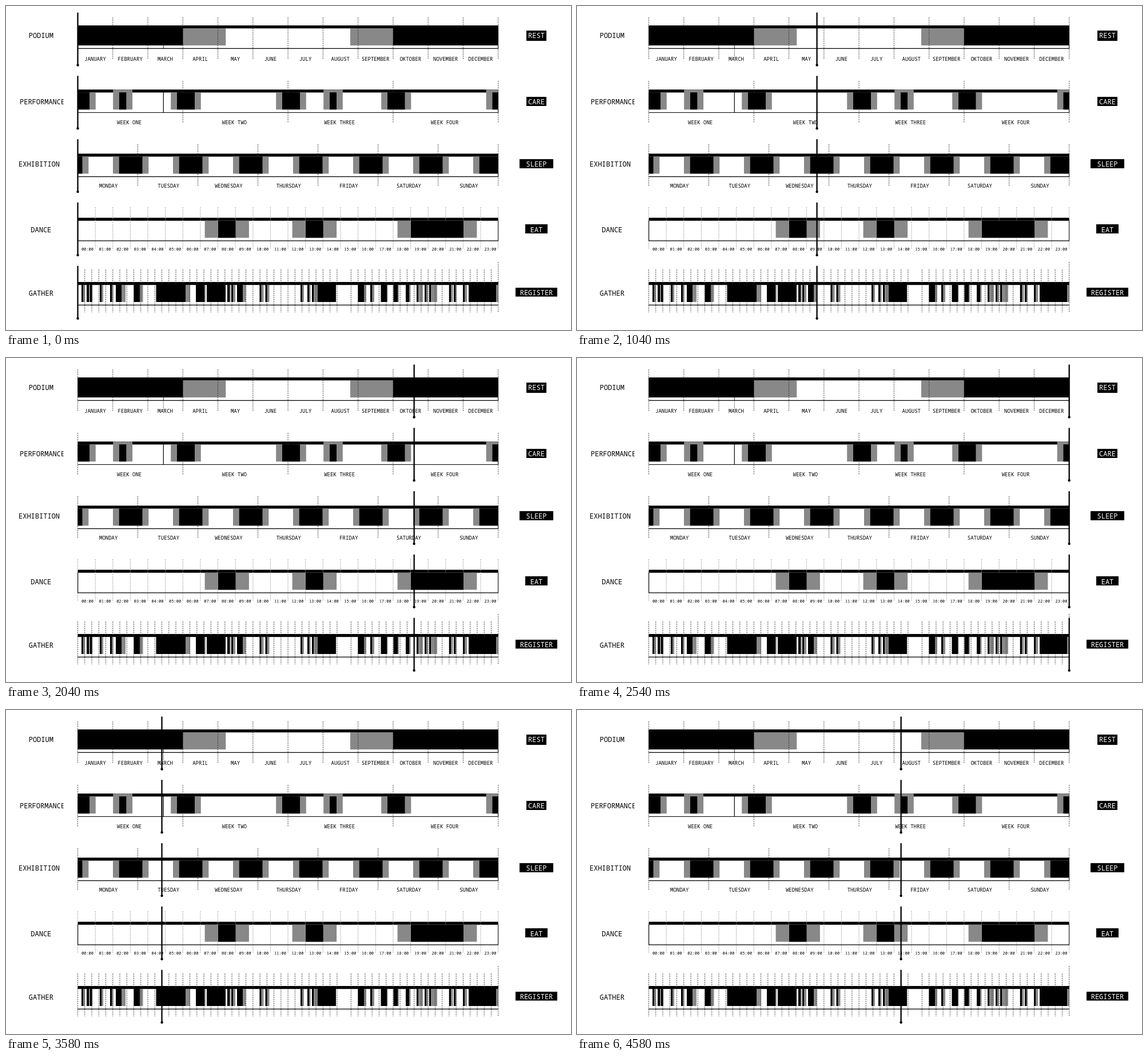
These frames come from a looping animation (988 by 567 pixels, 5080 ms). An HTML page:

```html
<!DOCTYPE html>
<html lang="en">
<head>
<meta charset="utf-8">
<title>Time scales</title>
<style>
  html, body { margin: 0; width: 100%; height: 100%; overflow: hidden; background: #fff; }
  svg { display: block; width: 988px; height: 567px; }
  text { font-family: "Noto Sans Mono", "DejaVu Sans Mono", monospace; text-anchor: middle; dominant-baseline: alphabetic; }
</style>
</head>
<body>
<svg id="stage" viewBox="0 0 988 567">
  <clipPath id="nameClip"><rect width="100.5" height="567"/></clipPath>
</svg>
<script>
const LEFT = 125.3, RIGHT = 861, WIDTH = 735.2;
const GREY = '#888';
const stage = document.getElementById('stage');

function add(tag, attrs, parent = stage) {
  const node = document.createElementNS('http://www.w3.org/2000/svg', tag);
  for (const key in attrs) node.setAttribute(key, attrs[key]);
  return parent.appendChild(node);
}
function box(x0, x1, y0, y1, fill = '#000') {
  x0 = Math.max(x0, LEFT);
  x1 = Math.min(x1, RIGHT);
  add('rect', { x: x0, y: y0, width: x1 - x0, height: y1 - y0, fill });
}
function line(x0, y0, x1, y1, width = 1.2, extra = {}, parent = stage) {
  return add('line', { x1: x0, y1: y0, x2: x1, y2: y1, stroke: '#000', 'stroke-width': width, ...extra }, parent);
}
function dashed(x, y0, y1, stroke = '#333') {
  return line(x, y0, x, y1, 0.9, { stroke, 'stroke-dasharray': '2.2 1.5' });
}
function label(text, x, y, size, extra = {}) {
  add('text', { x, y, 'font-size': size, ...extra }).textContent = text;
}

const days = [...Array(8).keys()];
const hours = [...Array(24).keys()].map(h => String(h).padStart(2, '0') + ':00');

// Each block is [black start, black end]; `pad` is the grey margin on both sides.
const rows = [
  { name: 'PODIUM', nameY: 56, tag: 'REST', tagBox: [910, 945, 43, 61], tagY: 56,
    top: 34, dashTop: 20, dashEnd: 93, parts: 12, pad: 75, blocks: [[125, 309.3], [677, 861]],
    labels: 'JANUARY FEBRUARY MARCH APRIL MAY JUNE JULY AUGUST SEPTEMBER OKTOBER NOVEMBER DECEMBER'.split(' '),
    labelY: 96, shift: 0 },
  { name: 'PERFORMANCE', nameY: 172, tag: 'CARE', tagBox: [910, 945, 159, 175], tagY: 172,
    top: 146.2, dashTop: 131, dashEnd: 204, parts: 4, pad: 10.8,
    blocks: [[125, 146], [198, 210.3], [299, 330], [483, 514], [566, 578], [667, 697.5], [850.5, 861]],
    labels: ['WEEK ONE', 'WEEK TWO', 'WEEK THREE', 'WEEK FOUR'], labelY: 207, shift: -1.6 },
  { name: 'EXHIBITION', nameY: 281, tag: 'SLEEP', tagBox: [898, 957, 268, 284], tagY: 281,
    top: 258.4, dashTop: 242, dashEnd: 315, parts: 7, pad: 10.8,
    blocks: days.map(d => [92.8 + d * 105, 133.5 + d * 105]),
    labels: 'MONDAY TUESDAY WEDNESDAY THURSDAY FRIDAY SATURDAY SUNDAY'.split(' '), labelY: 318, shift: 1.4 },
  { name: 'DANCE', nameY: 396, tag: 'EAT', tagBox: [908, 947, 382, 398], tagY: 395.5,
    top: 370.6, dashTop: 352, dashEnd: 425, dashColor: '#999', parts: 24, pad: 23.4,
    blocks: [[371, 401.5], [524, 554.7], [708, 800]],
    labels: hours, labelY: 427.5, shift: 1.8, size: 7 },
  { name: 'GATHER', nameY: 507, tag: 'REGISTER', tagBox: [891, 964, 493, 508.5], tagY: 506,
    top: 483, dashTop: 461, dashEnd: 536, parts: 60, pad: 0, blocks: [], labels: [] }
];

// Start, black width and trailing grey width of the short gatherings.
const gatherings = [
  [132, 3, 3], [141, 4, 2], [147, 3, 1.5], [164, 3, 3], [182, 3, 2.5], [192, 10, 7], [223.5, 10.5, 5.5],
  [262.5, 51.5, 8], [332, 15, 2], [351, 33, 0], [387, 4, 2], [394, 3, 4], [404, 10, 5.5],
  [443.5, 3, 4], [453.5, 3, 4], [515, 3, 3], [527, 3, 2.5], [535, 3, 6], [544.5, 32.5, 0],
  [615.5, 10.5, 4], [637, 3, 4], [655.5, 10.5, 1.5], [677.5, 7.5, 2], [699, 6, 2.5], [718, 3, 8],
  [732, 3, 3], [740, 3, 11], [775, 3, 3.5], [783, 3, 2], [799, 3, 4], [809, 48, 4]
];

rows.forEach((row, index) => {
  const { top, pad } = row, barTop = top + 5, barEnd = top + 35, base = top + 40.3;
  const last = index === 4;

  box(LEFT, RIGHT, top, top + 5.2);
  for (const [start, end] of row.blocks) {
    if (start > RIGHT + pad) continue;
    const raised = index === 1 && end - start < 13;
    box(start - pad, end + pad, raised ? top : barTop, barEnd, GREY);
  }
  if (last) for (const [x, black, grey] of gatherings) box(x + black, x + black + grey, barTop, barEnd, GREY);

  for (let i = 0; i <= row.parts; i++) {
    if (last && i === 38) continue;
    const start = last && i === 60 ? 448 : row.dashTop;
    dashed(LEFT + 0.2 + i * WIDTH / row.parts, start, row.dashEnd, row.dashColor);
  }

  for (const [start, end] of row.blocks)
    if (start < RIGHT) box(start, end, index === 0 ? top : barTop, barEnd);
  if (last) for (const [x, black] of gatherings) box(x, x + black, barTop, barEnd);

  line(LEFT, base, RIGHT, base);
  if (!last) line(860.6, index === 3 ? barTop : barEnd, 860.6, base, 1);
  if (index === 3) line(LEFT + 0.3, barTop, LEFT + 0.3, base);

  row.labels.forEach((text, i) =>
    label(text, LEFT + (i + 0.5) * WIDTH / row.parts + row.shift, row.labelY, row.size || 9));
  if (index === 1) label(row.name, 24, row.nameY, 12, { style: 'text-anchor:start', 'clip-path': 'url(#nameClip)' });
  else label(row.name, index === 2 ? 58 : 61.3, row.nameY, 12);

  const [x0, x1, y0, y1] = row.tagBox;
  add('rect', { x: x0, y: y0, width: x1 - x0, height: y1 - y0 });
  label(row.tag, (x0 + x1) / 2, row.tagY, 12, { fill: '#fff' });
});

line(275.3, 69, 275.3, 74, 0.9);
line(275.3, 147, 275.3, 186.5, 1.2);
const marchMark = dashed(275.3, 74, 93);

const cursor = add('g', {});
rows.forEach((row, i) => {
  const y = 11.5 + i * 110.8;
  line(0, y, 0, y + 92, 2.3, {}, cursor);
  add('circle', { cx: 0, cy: y + 92, r: 2.2 }, cursor);
});

// The cursor jumps a fifth of the scale at each of these times.
const jumps = [0, 540, 1040, 1540, 2040, 2540, 3080, 3580, 4080, 4580];
const LOOP = 5080;
const begin = performance.now();
function draw() {
  const time = (performance.now() - begin) % LOOP;
  const step = (jumps.filter(t => t <= time).length - 1) % 6;
  cursor.setAttribute('transform', `translate(${125.5 + step * 147.04} 0)`);
  marchMark.setAttribute('visibility', step ? 'visible' : 'hidden');
  requestAnimationFrame(draw);
}
draw();
</script>
</body>
</html>
```
